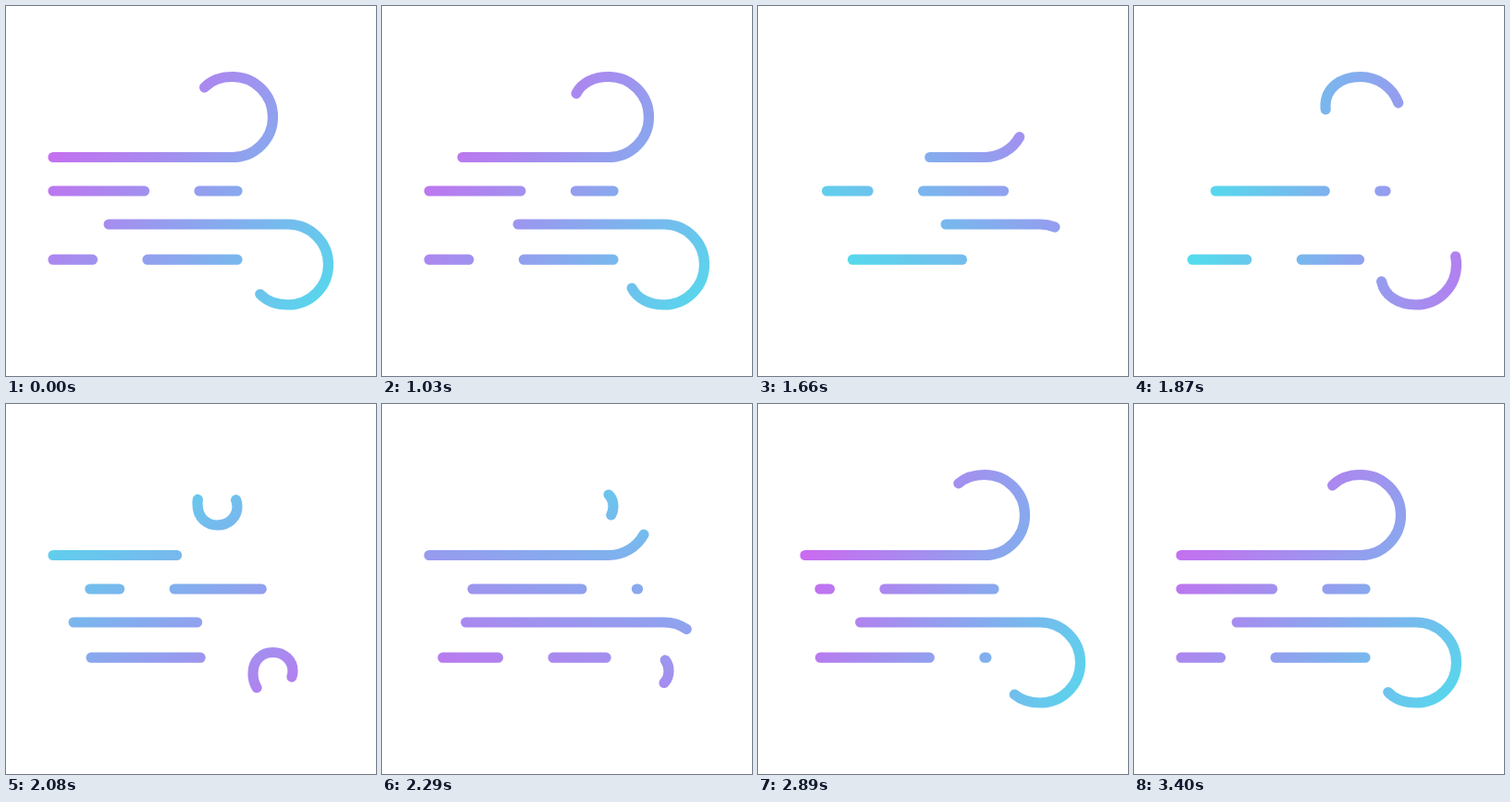
An HTML page for the animation above (3430 ms loop, 400 by 400 pixels).

```html
<!DOCTYPE html>
<html lang="en">
<head>
<meta charset="utf-8">
<title>Wind</title>
<style>
  html, body { margin: 0; height: 100%; overflow: hidden; background: #fff; }
  svg { display: block; width: 100vw; height: 100vh; }
</style>
</head>
<body>
<svg viewBox="0 0 400 400" fill="none" stroke="url(#sky)" stroke-width="11.2" stroke-linecap="round">
  <defs>
    <linearGradient id="sky" gradientUnits="userSpaceOnUse">
      <stop offset="0" stop-color="#c86cf0"/>
      <stop offset="1" stop-color="#4ee0ec"/>
    </linearGradient>
  </defs>
</svg>
<script>
const LOOP = 3430, HOLD = 1030, STEP = 30, STEPS = 80;
const svg = document.querySelector('svg');
const sky = document.getElementById('sky');

const clamp = x => Math.min(1, Math.max(0, x));
const smooth = x => x * x * (3 - 2 * x);
const easeOut = (n, start, length, power) => 1 - (1 - clamp((n - start) / length)) ** power;
const setAll = (el, attrs) => {
  for (const name in attrs) el.setAttribute(name, attrs[name]);
};

function addPath(attrs) {
  const el = document.createElementNS('http://www.w3.org/2000/svg', 'path');
  setAll(el, attrs);
  svg.append(el);
  return el;
}

// A straight run that curls into a spiral; side is 1 for upwards, -1 for downwards.
function gustShape(cx, cy, side) {
  const p = (x, y) => `${cx + x} ${cy + side * y} `;
  const sweep = side > 0 ? 0 : 1;
  return `M51 ${cy + side * 43.5}H${cx}` +
    `A43.5 43.5 0 0 ${sweep} ${p(0, -43.5)}` +
    `C${p(-22, -43.5)}${p(-38, -31)}${p(-38, -12)}` +
    `C${p(-38, 3)}${p(-28, 11)}${p(-16.5, 11)}` +
    `C${p(-4, 11)}${p(5, 2)}${p(5, -9)}` +
    `C${p(5, -14)}${p(3, -19)}${p(0, -22)}`;
}

// tail and head: visible part of the path at rest
const gusts = [
  { shape: gustShape(245, 120, 1), tail: 0, head: .778 },
  { shape: gustShape(305, 279.5, -1), tail: .114, head: .803 }
].map(gust => ({
  ...gust,
  waves: [0, 1, 2].map(() => addPath({ d: gust.shape, pathLength: 1 }))
}));

const streaks = [
  { y: 200, leftShift: 41, rightShift: 27, offset: 77 },
  { y: 274.2, leftShift: 15, rightShift: -8, offset: 21 }
].map(streak => ({ ...streak, el: addPath({ 'stroke-dasharray': '118 59.5' }) }));

function trim(el, tail, head) {
  const length = head - tail;
  setAll(el, {
    visibility: length > .001 ? 'visible' : 'hidden',
    'stroke-dasharray': `${Math.max(length, .001)} 3`,
    'stroke-dashoffset': -tail
  });
}

function draw(n) {
  const x = n / STEPS;

  const angle = (220 + 360 * (1 - (1 - x ** 1.8) ** 3)) * Math.PI / 180;
  const dx = 185 * Math.cos(angle), dy = 185 * Math.sin(angle);
  setAll(sky, { x1: 245 + dx, y1: 197 + dy, x2: 245 - dx, y2: 197 - dy });

  const leave = easeOut(n, 0, 17, 1.32);
  const passHead = easeOut(n, 14.7, 24.2, 2);
  const passTail = easeOut(n, 16.7, 33.9, 2);
  const arrive = easeOut(n, 29.7, 40, 2.67);
  for (const { tail, head, waves } of gusts) {
    trim(waves[0], tail + (1 - tail) * leave, head + (1 - head) * leave);
    trim(waves[1], passTail, passHead);
    trim(waves[2], tail * arrive, head * arrive);
  }

  const sway = smooth(1 - Math.abs(1 - 2 * x));
  for (const { y, leftShift, rightShift, offset, el } of streaks) {
    setAll(el, {
      d: `M${250 + rightShift * sway} ${y}H${51 + leftShift * sway}`,
      'stroke-dashoffset': offset + 710 * smooth(x)
    });
  }
}

function tick() {
  const t = performance.now() % LOOP;
  draw(t < HOLD ? 0 : Math.min(STEPS, 1 + Math.floor((t - HOLD) / STEP)));
  requestAnimationFrame(tick);
}
tick();
</script>
</body>
</html>
```
